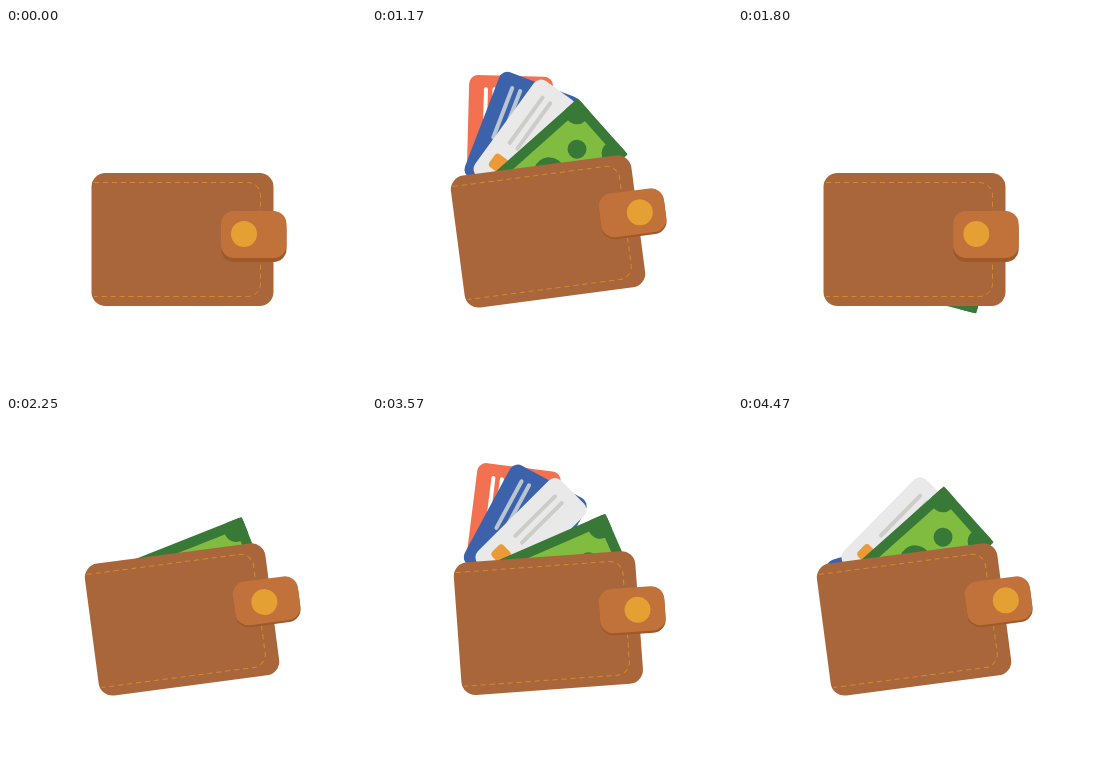
Animation of 360 by 360 pixels, one loop 4500 ms. Source, as an HTML page with a canvas:

```html
<!DOCTYPE html>
<html lang="en">
<head>
<meta charset="utf-8">
<title>Wallet</title>
<style>
  html, body { margin: 0; width: 100%; height: 100%; overflow: hidden; background: #fff; }
  canvas { display: block; width: 100vmin; height: 100vmin; }
</style>
</head>
<body>
<canvas id="stage" width="360" height="360"></canvas>
<script>
const ctx = document.getElementById('stage').getContext('2d');
const LOOP = 4500, CYCLE = 2100, STEP = 30;
const RAD = Math.PI / 180;

const clamp = v => Math.min(1, Math.max(0, v));
const lerp = (a, b, k) => a + (b - a) * k;
const progress = (t, from, to) => clamp((t - from) / (to - from));
const smooth = k => 0.5 - 0.5 * Math.cos(Math.PI * k);
const easeOut = k => Math.sin(k * Math.PI / 2);
const power = n => k => k ** n;

function box(x, y, w, h, r, color) {
  ctx.fillStyle = color;
  ctx.beginPath();
  ctx.roundRect(x, y, w, h, r);
  ctx.fill();
}

function dot(x, y, r, color) {
  ctx.fillStyle = color;
  ctx.beginPath();
  ctx.arc(x, y, r, 0, Math.PI * 2);
  ctx.fill();
}

function bars(x1, x2, ys, color) {
  ctx.strokeStyle = color;
  ctx.lineWidth = 4;
  ctx.lineCap = 'round';
  ctx.beginPath();
  for (const y of ys) {
    ctx.moveTo(x1, y);
    ctx.lineTo(x2, y);
  }
  ctx.stroke();
}

function drawOrange() {
  box(-16, -13, 106, 84, 9, '#f27151');
  bars(30, 76, [4, 12.5], '#fff');
}

function drawBlue() {
  box(-16, -9, 113, 86, 9, '#3c62ac');
  bars(30, 83, [7, 15.5], '#b9c6d2');
}

function drawWhite() {
  box(1, -15.6, 117.5, 50, 9, '#e9e9e9');
  bars(47, 103, [0, 9.5], '#cccdc8');
  box(16, -5, 16, 16, 4, '#ea9a38');
}

function drawBill() {
  const dark = '#397938';
  box(4, -26.7, 116, 75, 1, dark);
  ctx.clip();
  box(4, -16.7, 106, 55, 0, '#7fbc40');
  dot(110, -16.7, 12, dark);
  dot(110, 38.3, 12, dark);
  dot(85.5, 10.8, 9.5, dark);
  dot(49, 10, 15.5, dark);
}

// Back to front; each card swings about its own hinge behind the wallet.
const cards = [
  { draw: drawOrange, hinge: [108, 137], shut: 0, open: -88.5, rise: [320, 570], fall: [1170, 1690], ease: power(5) },
  { draw: drawBlue, hinge: [104, 135], shut: 0, open: -69, rise: [235, 455], fall: [1170, 1695], ease: power(4) },
  { draw: drawWhite, hinge: [110, 153], shut: 0, open: -54, rise: [130, 350], fall: [1315, 1890], ease: smooth },
  { draw: drawBill, hinge: [134, 170], shut: 15, open: -41.7, rise: [65, 255], fall: [1240, 1840], ease: smooth }
];

function drawCard(card, t) {
  const out = easeOut(progress(t, ...card.rise)) * (1 - card.ease(progress(t, ...card.fall)));
  if (out < 0.001) return;
  const drop = 40 * Math.max(0, 1 - out / 0.4);
  ctx.save();
  ctx.translate(card.hinge[0], card.hinge[1] + drop);
  ctx.rotate(lerp(card.shut, card.open, out) * RAD);
  card.draw();
  ctx.restore();
}

function tilt(t) {
  if (t < 270) return -7.5 * smooth(progress(t, 0, 120));
  if (t < 570) return lerp(-7.5, -6, smooth(progress(t, 270, 570)));
  if (t < 1190) return lerp(-6, -7.5, smooth(progress(t, 570, 1190)));
  return lerp(-7.5, 0, smooth(progress(t, 1190, 1790)));
}

function drawStitching() {
  ctx.strokeStyle = '#d08b32';
  ctx.lineWidth = 1;
  ctx.lineCap = 'butt';
  ctx.setLineDash([5, 4]);
  ctx.beginPath();
  ctx.moveTo(88, 154.5);
  ctx.arcTo(254.5, 154.5, 254.5, 168, 13);
  ctx.arcTo(254.5, 268.5, 241, 268.5, 13);
  ctx.lineTo(88, 268.5);
  ctx.stroke();
  ctx.setLineDash([]);
}

function drawWallet(t) {
  const closing = 1 - smooth(progress(t, 1370, 1830));
  const tab = smooth(progress(t, 30, 140)) * closing;
  const button = smooth(progress(t, 30, 220)) * closing;

  ctx.save();
  ctx.translate(115, 211);
  ctx.rotate(tilt(t) * RAD);
  ctx.translate(-115, -211);
  box(85.5, 145, 182, 133, 14, '#aa663b');
  drawStitching();

  const x = 215 + 15 * tab, y = 183 - tab, h = 47 - 3 * tab;
  box(x, y + 4 - 2 * tab, 65.5, h, 13, '#9e582a');
  box(x, y, 65.5, h, 13, '#c1713a');
  dot(238 + 32 * button, 206 - 1.5 * button, 13, '#e5a034');
  ctx.restore();
}

function render() {
  const clock = Math.floor((performance.now() % LOOP) / STEP) * STEP;
  const t = clock % CYCLE;
  ctx.fillStyle = '#fff';
  ctx.fillRect(0, 0, 360, 360);
  for (const card of cards) drawCard(card, t);
  drawWallet(t);
  requestAnimationFrame(render);
}
render();
</script>
</body>
</html>
```
